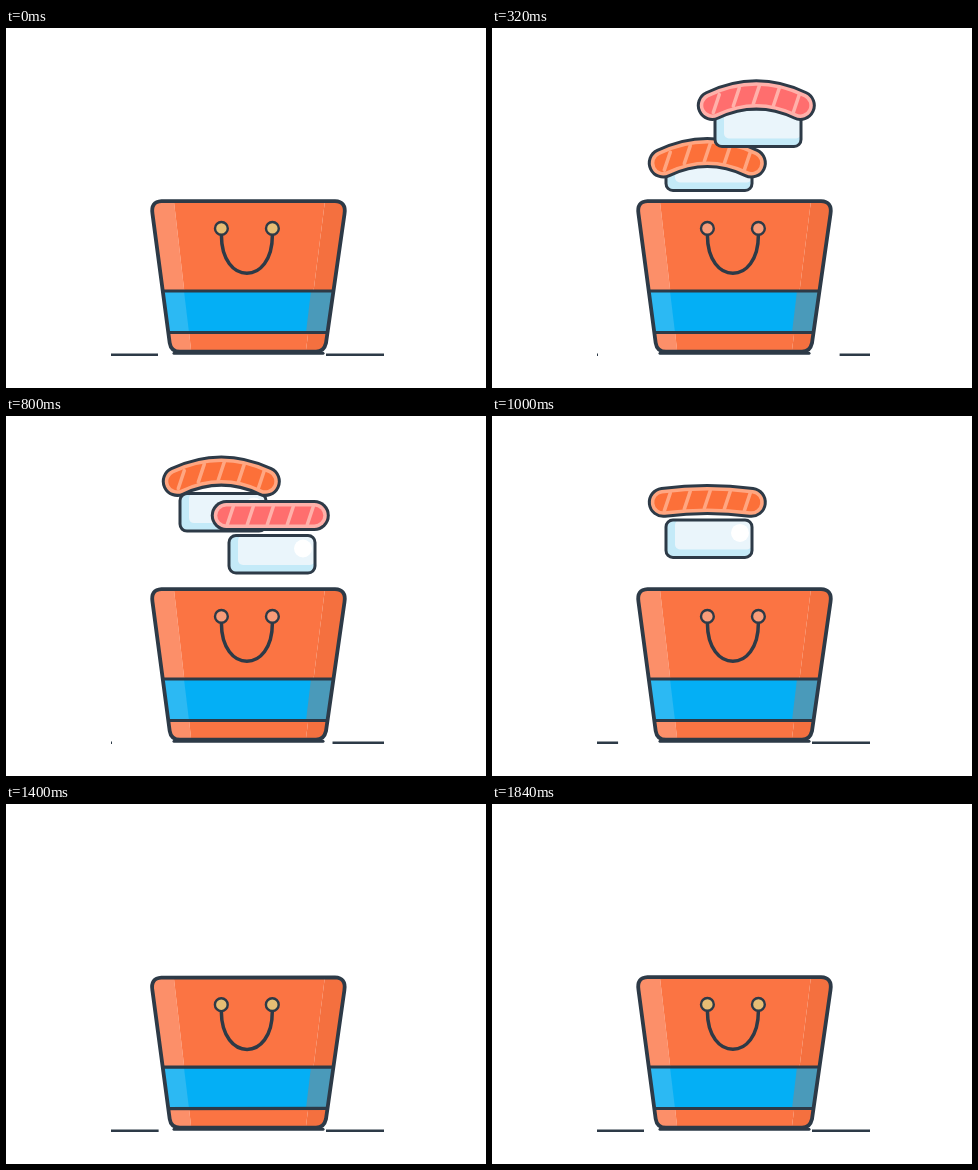
These frames come from a looping animation (480 px wide and 360 px high, 1920 ms). An HTML page:

```html
<!DOCTYPE html>
<html lang="en">
<head>
<meta charset="utf-8">
<title>Sushi bag</title>
<style>
  html, body { margin: 0; width: 100%; height: 100%; overflow: hidden; background: #fff; }
  svg { display: block; width: 100vw; height: 100vh; }
</style>
</head>
<body>
<svg id="stage" viewBox="0 0 480 360" fill="none" stroke-linecap="round" stroke-linejoin="round"></svg>
<script>
const LOOP = 1920, STEP = 40;
const INK = '#2d3a47';
const APEX = 560, FALL = 520, GONE = 920;
const stage = document.getElementById('stage');

const PIECES = [
  { x: 215.3, delay: 240, core: '#fc7039', rim: '#ffa681' },
  { x: 264.3, delay: 0, core: '#ff6e6e', rim: '#ffb1aa' }
];

const clamp = v => Math.min(1, Math.max(0, v));
const path = (d, attrs) => `<path d="${d}" ${attrs}/>`;
const stroke = (color, width) => `stroke="${color}" stroke-width="${width}"`;

function rice(x, bottom, shine) {
  const w = 86, h = 37.5, left = x - 41.3, top = bottom - h - 1.5;
  return `<rect x="${left}" y="${top}" width="${w}" height="${h}" rx="7" fill="#c4eaf8"/>
    <rect x="${left + 9}" y="${top}" width="${w - 9}" height="${h - 8}" rx="5" fill="#eaf5fb"/>
    ${shine ? `<circle cx="${left + 74}" cy="${top + 13}" r="9" fill="#fff"/>` : ''}
    <rect x="${left}" y="${top}" width="${w}" height="${h}" rx="7" ${stroke(INK, 3)}/>`;
}

function fish({ x, core, rim }, top, arch) {
  const mid = top + 15.5, end = mid + arch;
  const spine = `M${x - 44},${end}Q${x},${mid - arch} ${x + 44},${end}`;
  let stripes = '';
  for (let dx = -40; dx <= 40; dx += 20) {
    const y = mid + arch * (dx / 44) ** 2;
    stripes += `M${x + dx + 3},${y - 9}l-6,18`;
  }
  return path(spine, stroke(INK, 31)) + path(spine, stroke(rim, 25)) +
    path(spine, stroke(core, 18)) + path(stripes, stroke(rim, 3.5));
}

// Each piece shoots up with an ease-out, then drops with a cubic ease-in.
function sushi(piece, t) {
  const age = t - piece.delay;
  if (age < 40 || age >= GONE) return '';
  const rise = Math.max(0, (APEX - age) / 480);
  const fall = Math.max(0, (age - FALL) / 280);
  const drop = 42 * fall ** 3;
  const arch = 10.5 * (1 - clamp(fall) ** 2);
  return rice(piece.x, 116.5 + 47.5 * rise ** 3.75 + drop, fall > 0) +
    fish(piece, 39 + 70 * rise ** 2.5 + drop + 3 * clamp(fall), arch);
}

// Damped squash after a piece drops in.
function impact(t, start) {
  const s = Math.max(0, t - start);
  return 1.9 * Math.sin(Math.PI * s / 120) * Math.exp(-s / 80);
}

function bag(t, squash, lean) {
  const warp = d => d.replace(/([\d.]+),([\d.]+)/g, (_, px, py) => {
    const x = +px, y = +py, height = (324 - y) / 151;
    return `${x - 2.5 * lean * height},${y + squash * height - 1.7 * lean * (x - 242) / 97}`;
  });
  const shape = warp('M155.5,173.2L329,173.2Q340.5,173.7 338.5,186L320,315Q318,323.7 310,323.7' +
    'L174,323.7Q165,323.7 163.7,315L146.5,186Q144.5,173.7 155.5,173.2Z');
  const part = (d, color) => path(warp(d), `fill="${color}"`);
  const swing = 6 * lean;
  const eyelet = t >= 40 && t < 1200 ? '#f99c79' : '#e6bd74';
  const rings = [215.4, 266.4].map(x => {
    const [cx, cy] = warp(`${x},200.4`).split(',');
    return `<circle cx="${cx}" cy="${cy}" r="6.4" fill="${eyelet}" ${stroke(INK, 2.4)}/>`;
  }).join('');
  return `<clipPath id="inside">${path(shape, '')}</clipPath>
    <g clip-path="url(#inside)">
      ${part('M140,165L167,165L186,330L140,330Z', '#fc8f69')}
      ${part('M167,165L320,165L299,330L186,330Z', '#fb7443')}
      ${part('M320,165L345,165L345,330L299,330Z', '#f4703f')}
      ${part('M150,263L335,263L330,304.5L150,304.5Z', '#04aff5')}
      ${part('M150,263L178,263L183,304.5L150,304.5Z', '#2cb9f3')}
      ${part('M305,263L335,263L330,304.5L300,304.5Z', '#4a9aba')}
      ${path(warp('M150,263L335,263M150,304.5L335,304.5'), stroke(INK, 3.2))}
    </g>
    ${path(shape, stroke(INK, 3.8))}
    ${path(warp(`M215.4,207C${215.4 + swing},258 ${266.4 + swing},258 266.4,207`), stroke(INK, 3.5))}
    ${rings}`;
}

// The ground line opens up on both sides while the pieces are in the air.
function ground(t, lean) {
  const left = 152 - 46 * clamp(2 * Math.sin(Math.PI * t / 1100)) * (t < 1100) + 13 * clamp(lean);
  const right = 320 + 30 * clamp(Math.sin(Math.PI * t / 860)) * (t < 860);
  return path(`M105,326.8H${left}M${right},326.8H378`, stroke(INK, 2.4) + ' stroke-linecap="butt"') +
    path('M168,325.3H317', stroke(INK, 3));
}

function draw(t) {
  const first = impact(t, 880), second = impact(t, 1120);
  const squash = 6 * (first + second), lean = second - first;
  stage.innerHTML = ground(t, lean) + PIECES.map(p => sushi(p, t)).join('') + bag(t, squash, lean);
}

const begin = performance.now();
function frame() {
  const t = (performance.now() - begin) % LOOP;
  draw(Math.floor(t / STEP) * STEP);
  requestAnimationFrame(frame);
}
frame();
</script>
</body>
</html>
```
